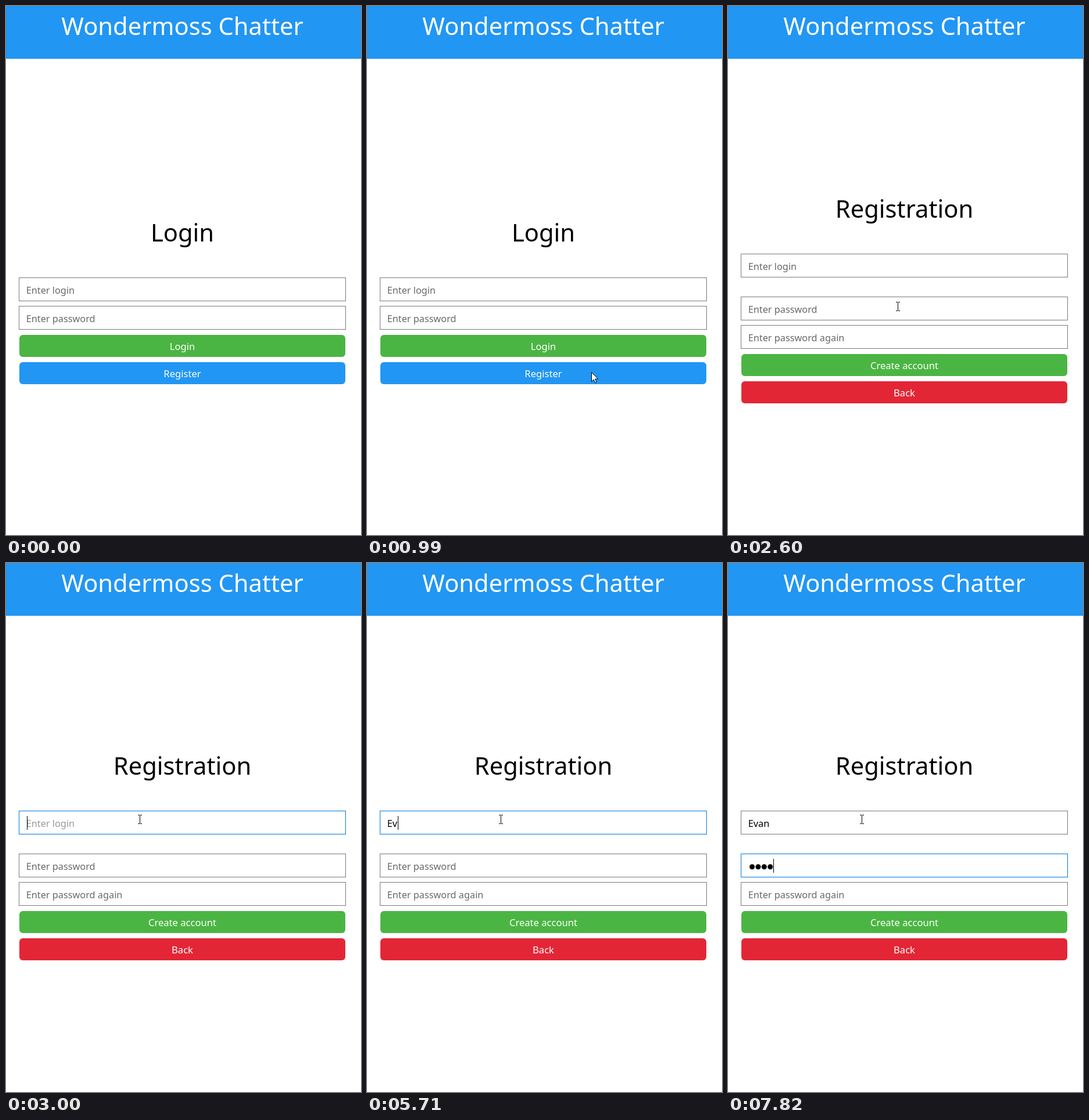
An HTML page for the animation above (8 s loop, 611 px wide and 912 px high).

```html
<!DOCTYPE html>
<html lang="en">
<head>
<meta charset="utf-8">
<title>Sign-up form</title>
<style>
html, body { margin: 0; width: 100%; height: 100%; overflow: hidden; background: #fff; }
svg { display: block; width: 100vw; height: 100vh; font-family: "Noto Sans", "Open Sans", sans-serif; }
.title { font-size: 41.7px; text-anchor: middle; }
.label { font-size: 16.6px; text-anchor: middle; fill: #fff; }
.hint, .value { font-size: 16.3px; }
.hint { fill: #666969; }
.field { fill: #fff; stroke: #7a7a7a; }
.green { fill: #4bb543; }
.blue { fill: #2196f3; }
.red { fill: #e32636; }

/* every change is a hard cut */
.anim { animation: 8s step-end -2ms infinite; }
#signIn { animation-name: signIn; }
#signUp { animation-name: signUp; }
#mouse { animation-name: move; }
#arrow { animation-name: arrow; }
#beam { animation-name: beam; }
#nameBox { animation-name: nameFocus; }
#nameHint { animation-name: nameHint; }
#passBox { animation-name: passFocus; }
#passHint { animation-name: passHint; }
#nameCaret { animation-name: nameCaret; }
#passCaret { animation-name: passCaret; }
.k1 { animation-name: key1; }
.k2 { animation-name: key2; }
.k3 { animation-name: key3; }
.d1 { animation-name: dot1; }
.d2 { animation-name: dot2; }
.d3 { animation-name: dot3; }
.d4 { animation-name: dot4; }

@keyframes signIn { 0% { opacity: 1 } 24.75%, 100% { opacity: 0 } }
@keyframes signUp { 0% { opacity: 0 } 24.75%, 100% { opacity: 1 } }

@keyframes move {
  0% { transform: translate(531px, 930px) }
  4.875% { transform: translate(531px, 893px) }
  6.125% { transform: translate(508px, 851px) }
  7.375% { transform: translate(471px, 786px) }
  8.625% { transform: translate(432px, 715px) }
  9.875% { transform: translate(404px, 664px) }
  11.125% { transform: translate(390px, 638px) }
  12.375% { transform: translate(386px, 631px) }
  28.75% { transform: translate(380px, 623px) }
  30% { transform: translate(363px, 603px) }
  31.25% { transform: translate(331px, 565px) }
  32.5% { transform: translate(292px, 518px) }
  33.75% { transform: translate(258px, 476px) }
  35% { transform: translate(238px, 451px) }
  36.25%, 100% { transform: translate(230px, 442px) }
}
@keyframes arrow { 0%, 33.75% { opacity: 1 } 31.25%, 35%, 100% { opacity: 0 } }
@keyframes beam { 0%, 33.75% { opacity: 0 } 31.25%, 35%, 100% { opacity: 1 } }

@keyframes nameFocus { 37.5% { stroke: #0078d7 } 0%, 82.75%, 100% { stroke: #7a7a7a } }
@keyframes passFocus { 0% { stroke: #7a7a7a } 82.75%, 100% { stroke: #0078d7 } }
@keyframes nameHint {
  0% { fill: #666969; opacity: 1 }
  37.5% { fill: #999; opacity: 1 }
  61.375%, 100% { fill: #999; opacity: 0 }
}
@keyframes passHint {
  0% { fill: #666969; opacity: 1 }
  82.75% { fill: #999; opacity: 1 }
  90.25%, 100% { fill: #999; opacity: 0 }
}

@keyframes nameCaret {
  0%, 57.625% { opacity: 0; transform: none }
  37.5% { opacity: 1; transform: none }
  61.375% { opacity: 1; transform: translateX(8px) }
  71.375% { opacity: 1; transform: translateX(17px) }
  76.625% { opacity: 1; transform: translateX(36px) }
  82.75%, 100% { opacity: 0; transform: none }
}
@keyframes passCaret {
  0%, 89% { opacity: 0; transform: none }
  82.75% { opacity: 1; transform: none }
  90.25% { opacity: 1; transform: translateX(11px) }
  92.75% { opacity: 1; transform: translateX(22px) }
  95.25% { opacity: 1; transform: translateX(32px) }
  97.75%, 100% { opacity: 1; transform: translateX(42px) }
}
@keyframes key1 { 0% { fill-opacity: 0 } 61.375%, 100% { fill-opacity: 1 } }
@keyframes key2 { 0% { fill-opacity: 0 } 71.375%, 100% { fill-opacity: 1 } }
@keyframes key3 { 0% { fill-opacity: 0 } 76.625%, 100% { fill-opacity: 1 } }
@keyframes dot1 { 0% { opacity: 0 } 90.25%, 100% { opacity: 1 } }
@keyframes dot2 { 0% { opacity: 0 } 92.75%, 100% { opacity: 1 } }
@keyframes dot3 { 0% { opacity: 0 } 95.25%, 100% { opacity: 1 } }
@keyframes dot4 { 0% { opacity: 0 } 97.75%, 100% { opacity: 1 } }
</style>
</head>
<body>
<svg viewBox="0 0 611 912">
  <defs>
    <rect id="box" x="22.5" y=".5" width="562" height="40"/>
    <rect id="button" x="23" width="561" height="38" rx="6"/>
    <rect id="caret" x="36" width="1" height="24"/>
    <circle id="dot" cy="523.7" r="4.5"/>
  </defs>

  <rect class="blue" width="611" height="91"/>
  <text class="title" x="303.5" y="49.5" fill="#fff">Wondermoss Chatter</text>

  <g id="signIn" class="anim">
    <text class="title" x="303.5" y="405.5">Login</text>
    <use href="#box" y="468" class="field"/>
    <text class="hint" x="34.7" y="495.5">Enter login</text>
    <use href="#box" y="517" class="field"/>
    <text class="hint" x="34.7" y="544.5">Enter password</text>
    <use href="#button" y="567" class="green"/>
    <text class="label" x="303.5" y="592.5">Login</text>
    <use href="#button" y="614" class="blue"/>
    <text class="label" x="303.5" y="639.5">Register</text>
  </g>

  <g id="signUp" class="anim">
    <text class="title" x="303.5" y="364.5">Registration</text>

    <use href="#box" y="427" id="nameBox" class="field anim"/>
    <text id="nameHint" class="hint anim" x="34.7" y="454.5">Enter login</text>
    <text class="value" x="34.7" y="454.5"><tspan class="anim k1">E</tspan><tspan class="anim k2">v</tspan><tspan class="anim k3">an</tspan></text>
    <use href="#caret" y="436" id="nameCaret" class="anim"/>

    <use href="#box" y="501" id="passBox" class="field anim"/>
    <text id="passHint" class="hint anim" x="34.7" y="528.5">Enter password</text>
    <use href="#dot" x="41.5" class="anim d1"/>
    <use href="#dot" x="51.9" class="anim d2"/>
    <use href="#dot" x="62.3" class="anim d3"/>
    <use href="#dot" x="72.7" class="anim d4"/>
    <use href="#caret" y="510" id="passCaret" class="anim"/>

    <use href="#box" y="550" class="field"/>
    <text class="hint" x="34.7" y="577.5">Enter password again</text>

    <use href="#button" y="600" class="green"/>
    <text class="label" x="303.5" y="625.5">Create account</text>
    <use href="#button" y="647" class="red"/>
    <text class="label" x="303.5" y="672.5">Back</text>
  </g>

  <g id="mouse" class="anim">
    <path id="arrow" class="anim" d="M.5 .5V16.5L4.2 13L6.6 18.6L9 17.6L6.6 12H11.7Z" fill="#fff" stroke="#000"/>
    <path id="beam" class="anim" d="M-3 -7.5H0M1 -7.5H4M.5 -7V7M-3 7.5H0M1 7.5H4" fill="none" stroke="#000"/>
  </g>
</svg>
</body>
</html>
```
